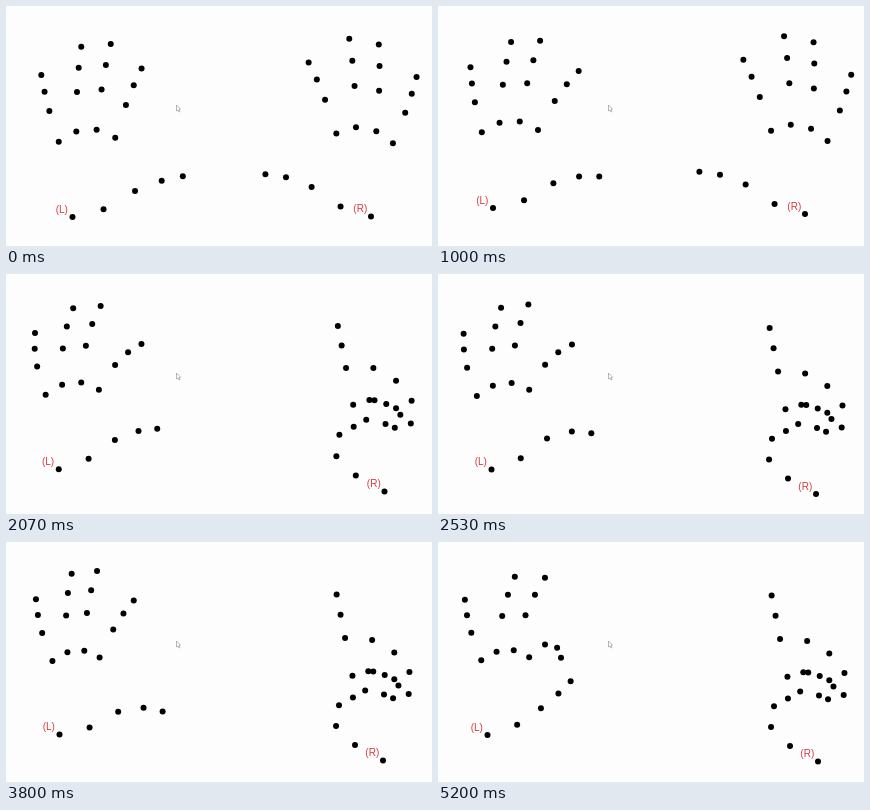
Animation, 426 px wide and 240 px high, one loop 5.27 s. Source, as an HTML page with a canvas:

```html
<!DOCTYPE html>
<html lang="en">
<head>
<meta charset="utf-8">
<title>Hand landmarks</title>
<style>
html, body { margin: 0; width: 100%; height: 100%; overflow: hidden; background: #fdfdfd; }
canvas { display: block; }
</style>
</head>
<body>
<canvas id="stage" width="426" height="240"></canvas>
<script>
const ctx = document.getElementById('stage').getContext('2d');
const LOOP = 5270, FPS = 15, DOT = 3;

// Anatomy of a left hand: index, middle, ring, little finger.
const KNUCKLE = [90, 90.5, 85.5, 76.5];    // distance from the wrist
const LENGTH = [72, 87, 85, 69], THUMB = 84;
const BONES = [0.466, 0.286, 0.248], THUMB_BONES = [0.42, 0.33, 0.25];

// Angles are degrees clockwise from straight up.
const polar = (deg, r) => {
  const a = deg * Math.PI / 180;
  return [r * Math.sin(a), -r * Math.cos(a)];
};

const straight = (angle, curl, length, shares) =>
  shares.map((share, j) => [angle + curl * j, length * share]);

// A finger folded over the palm, seen from the front; k counts from the middle finger.
const folded = k => [
  [-7 - 16 * k, 31.5 - 7 * k],
  [182 - 2 * k, 31.5 - 4.7 * k],
  [157 + 4 * k - 15 * k * k, 20.6 - 2.2 * k]
];

// palm: [direction, degrees between knuckles]; thumb and index: [angle, curl, stretch];
// lean, spread and curl shape the other three fingers.
function landmarks({ x, y, palm, thumb, index, lean = 0, spread = 1, curl = 0,
                     reach = 1, size = 1, fold = false }, side) {
  const points = [[x, y]];
  const addFinger = (root, bones) => {
    let dx = 0, dy = 0;
    [root, ...bones].forEach(([angle, length]) => {
      const [bx, by] = polar(angle, length * size);
      dx += bx;
      dy += by;
      points.push([x + side * dx, y + dy]);
    });
  };
  const [thumbAngle, thumbCurl, thumbStretch = reach] = thumb;
  addFinger([thumbAngle + 16, 32], straight(thumbAngle, thumbCurl, THUMB * thumbStretch, THUMB_BONES));
  KNUCKLE.forEach((distance, i) => {
    const k = i - 1;
    const [angle, bend, stretch = reach] = i ? [lean + spread * (6 - 6 * k * k), curl] : index;
    const bones = i && fold ? folded(k) : straight(angle, bend, LENGTH[i] * stretch, BONES);
    addFinger([palm[0] + palm[1] * (1.5 - i), distance], bones);
  });
  return points;
}

const open = { x: 66.5, y: 211, palm: [9, 12.9], thumb: [60, 9, 1.03], index: [18, 3.6, 1.03], lean: 1, curl: 3 };
const settled = { ...open, x: 53.5, y: 192.5, palm: [11, 11], thumb: [61, 20, 0.96], index: [26, 6.3, 0.96],
  lean: -2, curl: 6.5, reach: 0.965, size: 0.965 };
const lowered = { ...settled, x: 51, y: 193, palm: [10, 11.2], thumb: [58, 19], index: [25, 5],
  lean: 0, curl: 5.5, reach: 0.945, size: 0.98 };
const rightOpen = { x: 365, y: 210.5, palm: [3, 13.1], thumb: [56, 13, 0.99], index: [18.5, 3.6, 1.06],
  lean: -4, curl: 3, reach: 1.02 };
const rightLifted = { ...rightOpen, x: 367, y: 208, palm: [2.5, 13.1] };
const pointing = { x: 378, y: 220, palm: [4.1, 10.5], thumb: [45, -53, 0.76], index: [11, 0, 1.15], fold: true };
const raised = { ...pointing, x: 379, y: 215, size: 1.05, index: [11, 0, 1.03] };

const hands = [
  { label: '(L)', side: 1, keys: [
    [0, open],
    [1000, { ...open, x: 55, y: 202, palm: [10.8, 12.8], thumb: [60, 15], index: [30, 5.8, 1],
      lean: 5, curl: 4, reach: 0.96 }],
    [1600, { ...open, x: 52, y: 195, palm: [9.8, 12.3], thumb: [56, 8], index: [34, 11, 0.88],
      lean: 3.5, curl: 9, reach: 0.9 }],
    [2530, { ...open, x: 53.5, y: 195.5, palm: [7, 12.2], thumb: [53, 21, 0.95], index: [32.5, 14, 0.9],
      lean: -1, curl: 9, reach: 0.95, size: 0.98 }],
    [3200, settled],
    [3800, settled],
    [4600, lowered],
    [4840, lowered],
    [5200, { ...open, x: 49.5, y: 193, palm: [11.7, 11], thumb: [55, -5, 0.84], index: [51, 54, 0.62],
      lean: 9, spread: 1.6, curl: 6, reach: 0.93, size: 0.98 }]
  ] },
  { label: '(R)', side: -1, keys: [
    [0, rightOpen],
    [1000, rightLifted],
    [1200, { ...rightLifted, x: 373, y: 209 }],
    [1500, raised],
    [1600, raised],
    [2530, pointing],
    [2730, { ...pointing, x: 378.5, y: 221.5 }],
    [3800, { ...pointing, x: 377, y: 218.5 }],
    [4600, { ...pointing, x: 378, y: 219 }],
    [5200, { ...pointing, x: 380, y: 219.5 }]
  ] }
];
for (const { keys, side } of hands)
  for (const key of keys) key[1] = landmarks(key[1], side);

const mix = (a, b, k) => a + (b - a) * k;

function poseAt(keys, t) {
  const next = keys.findIndex(key => key[0] > t);
  if (next < 0) return keys[keys.length - 1][1];
  const [t0, from] = keys[next - 1], [t1, to] = keys[next];
  const k = (t - t0) / (t1 - t0);
  return from.map(([x, y], i) => [mix(x, to[i][0], k), mix(y, to[i][1], k)]);
}

function drawHand({ label, keys }, t) {
  const points = poseAt(keys, t);
  ctx.fillStyle = '#000';
  for (const [x, y] of points) {
    ctx.beginPath();
    ctx.arc(x, y, DOT, 0, 2 * Math.PI);
    ctx.fill();
  }
  const [x, y] = points[0];
  ctx.fillStyle = '#d23c42';
  ctx.fillText(label, x - 10.7, y - 4.5);
}

const cursor = new Path2D('M170.5 99v6l1.5-1 1 2 1-.5-1-2 1.5-.2z');

function drawCursor() {
  ctx.fillStyle = '#fff';
  ctx.fill(cursor);
  ctx.strokeStyle = '#999';
  ctx.lineWidth = 0.7;
  ctx.stroke(cursor);
}

function draw() {
  const step = Math.floor((performance.now() % LOOP + 4) * FPS / 1000);
  const t = step * 1000 / FPS;
  ctx.fillStyle = '#fdfdfd';
  ctx.fillRect(0, 0, 426, 240);
  ctx.font = '10px "Liberation Sans", Arial, sans-serif';
  ctx.textAlign = 'center';
  drawCursor();
  hands.forEach(hand => drawHand(hand, t));
  requestAnimationFrame(draw);
}
draw();
</script>
</body>
</html>
```
